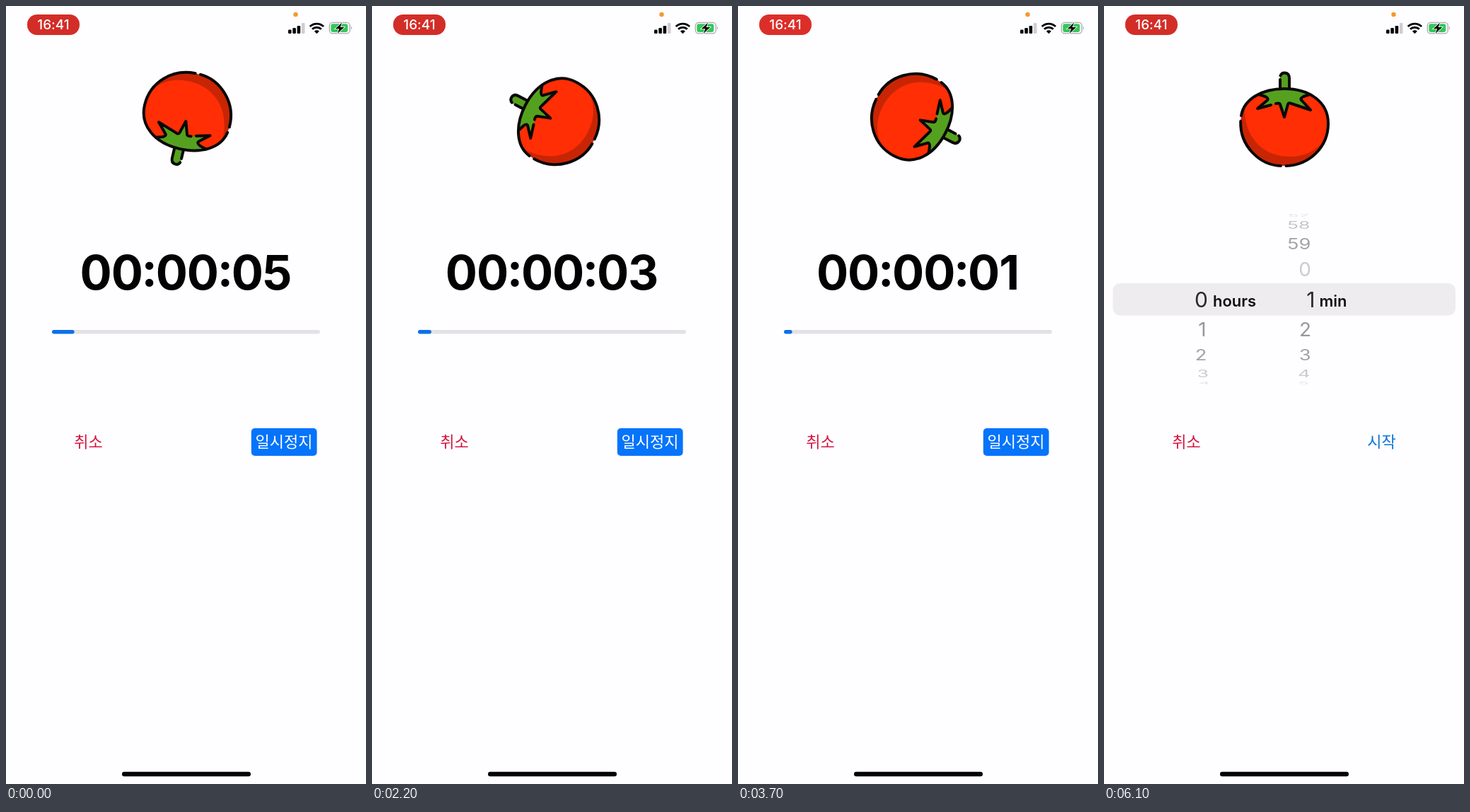
Write an HTML page that moves like this. It is 509 px wide and 1100 px high and loops after 6.2 s.

```html
<!DOCTYPE html>
<html lang="ko">
<head>
<meta charset="utf-8">
<title>Timer</title>
<style>
  html, body { margin: 0; width: 100%; height: 100%; overflow: hidden; background: #fefdff; }
  svg { display: block; width: 100%; height: 100%; }
  text { font-family: Inter, "Liberation Sans", sans-serif; font-feature-settings: "calt" 0; }
  .ko { font: 400 22px "Noto Sans CJK KR", "Noto Sans CJK", sans-serif; text-anchor: middle; }
  .unit { font-size: 22px; font-weight: 600; fill: #111013; }
  .row { font-size: 28px; text-anchor: end; }
  .sel { font-size: 30px; text-anchor: end; fill: #2a292c; }
  #clock { font-size: 67px; font-weight: 700; letter-spacing: -1.1px; text-anchor: middle; fill: #030203; }
  .ink { fill: none; stroke: #0b0807; stroke-width: 4; stroke-linecap: round; stroke-linejoin: round; }
</style>
</head>
<body>
<svg viewBox="0 0 509 1100" preserveAspectRatio="none">
  <defs>
    <clipPath id="bodyClip"><use href="#body"/></clipPath>
    <path id="body" d="M255 117C291 117 317 136 317 166C317 200 289 226 255 226C221 226 193 200 193 166C193 136 219 117 255 117Z"/>
  </defs>

  <!-- status bar -->
  <rect id="pill" x="30" y="12" width="74" height="29" rx="14"/>
  <text x="67" y="33.3" font-size="19" font-weight="500" fill="#fff" text-anchor="middle">16:41</text>
  <circle cx="409.5" cy="12" r="3.2" fill="#f39a2c"/>
  <g fill="#050505">
    <rect x="399" y="33.5" width="4.6" height="5.5" rx="1.2"/>
    <rect x="405.3" y="31" width="4.6" height="8" rx="1.2"/>
    <rect x="411.6" y="28" width="4.6" height="11" rx="1.2"/>
    <rect x="417.9" y="24" width="4.6" height="15" rx="1.2" fill="#cfcdd0"/>
    <path d="M439.4 39.3L435.9 35.8A5 5 0 0 1 442.9 35.8Z"/>
  </g>
  <g fill="none" stroke="#050505" stroke-width="2.9">
    <path d="M433 32.8A9.2 9.2 0 0 1 445.8 32.8"/>
    <path d="M429.7 29A14 14 0 0 1 449.1 29"/>
  </g>
  <rect x="457.3" y="23.3" width="29" height="15.6" rx="4.6" fill="none" stroke="#a9a8ab" stroke-width="1.3"/>
  <rect x="459.3" y="25.3" width="24" height="11.6" rx="2.8" fill="#35c65a"/>
  <path d="M488 28.6Q490 31 488 33.6Z" fill="#9b9a9d"/>
  <path d="M475 23.6L465.6 32.2H471.2L468.6 39L478.2 30H472.6Z" fill="#050505" stroke="#fefdff" stroke-width="1.6" paint-order="stroke"/>

  <!-- tomato -->
  <g id="tomato">
    <path d="M249 118V100Q249 95 255 95Q262 95 262 102V118Z" fill="#55a11f"/>
    <use href="#body" fill="#c82505"/>
    <g clip-path="url(#bodyClip)">
      <path d="M199 110V152C202 190 228 213 262 213C283 213 300 205 311 190L330 160V100H199Z" fill="#ff2e04"/>
      <path d="M219 125L232 131L217 145L238 139L247 137L255 157L261 137L292 147L278 131L291 125L280 112H230Z" fill="#55a11f"/>
    </g>
    <g class="ink">
      <path d="M249 115V104M249.5 98.5Q251 94.5 255.5 94.5Q262 95 262 102V116"/>
      <path d="M257.5 226C290 225 317 200 317 166C317 136 291 117 255 117C224 117 198 131 194 155"/>
      <path d="M193.2 163C192 198 220 225 250 226"/>
      <path d="M219 125L228 128Q234 131 230 134L217 145L236 140"/>
      <path d="M243 138Q248 136.5 249 139L255 157L260 139Q261 136 265 138L292 147L280 134Q276 131 282 128L291 125"/>
    </g>
  </g>

  <!-- countdown -->
  <g id="timer">
    <text id="clock" x="254" y="401"></text>
    <rect x="65" y="458" width="379" height="5.5" rx="2.75" fill="#e3e1e5"/>
    <rect id="bar" x="65" y="458" height="5.5" rx="2.75" fill="#0a71e8"/>
  </g>

  <!-- picker -->
  <g id="picker">
    <rect x="12.5" y="392" width="484.5" height="45.5" rx="10" fill="#eeecef"/>
    <text class="sel" x="147" y="425.5">0</text>
    <text class="unit" x="154" y="425">hours</text>
    <text class="sel" x="298.5" y="425.5">1</text>
    <text class="unit" x="304.5" y="425">min</text>
    <g id="rows"></g>
  </g>

  <!-- buttons -->
  <text class="ko" x="116.5" y="623.7" fill="#d3143f">취소</text>
  <g id="pause">
    <rect x="346.8" y="597" width="92.8" height="39" rx="5" fill="#0574fb"/>
    <text class="ko" x="393" y="623.7" fill="#fff">일시정지</text>
  </g>
  <text id="start" class="ko" x="392.5" y="623.7" fill="#0b74d6">시작</text>

  <rect x="164" y="1082.8" width="182" height="6.4" rx="3.2" fill="#050305"/>
</svg>
<script>
  const LOOP = 6200, STEP = 100, FIRST_TICK = 405, SECOND = 1000, HALF = 500;
  const $ = id => document.getElementById(id);
  const clamp = v => Math.min(1, Math.max(0, v));

  // cubic-bezier(.42, 0, .58, 1)
  function ease(x) {
    x = clamp(x);
    let lo = 0, hi = 1;
    for (let i = 0; i < 24; i++) {
      const s = (lo + hi) / 2, r = 1 - s;
      if (1.26 * r * r * s + 1.74 * r * s * s + s ** 3 < x) lo = s; else hi = s;
    }
    return lo * lo * (3 - 2 * lo);
  }

  // Wheel rows: label, right edge, centre y, vertical scale, grey level
  const rows = [
    ['57', 290, 296, .18, 226], ['58', 291.5, 309.5, .54, 196], ['59', 292.5, 336, .78, 164],
    ['0', 293, 372, .98, 204],
    ['2', 293, 457, .98, 152], ['3', 292.5, 493.5, .75, 162], ['4', 291.5, 519.5, .53, 202], ['5', 290, 533, .18, 228],
    ['1', 144.5, 457, .98, 152], ['2', 145.5, 493.5, .75, 162], ['3', 148, 519.5, .53, 202], ['4', 150, 533, .18, 228]
  ];
  $('rows').innerHTML = rows.map(([label, x, y, sy, g]) =>
    `<text class="row" transform="translate(${x} ${y}) scale(${.9 + .1 * sy} ${sy})" y="10.2" fill="rgb(${g},${g - 1},${g + 2})">${label}</text>`
  ).join('');

  const colon = '<tspan dx="-1.2" dy="-5">:</tspan>';
  const clockText = s => `00${colon}<tspan dx="-1.2" dy="5">00</tspan>${colon}<tspan dx="-1.2" dy="5">0${s}</tspan>`;
  const barWidth = s => s > 0 ? Math.max(11, 379 * s / 60) : 0;
  let shown = -1;

  function draw(t) {
    const tick = Math.floor((t - FIRST_TICK) / SECOND);
    const since = t - FIRST_TICK - tick * SECOND;
    const left = Math.max(0, 4 - tick);
    const done = tick > 4;

    // Two eased half turns per tick
    const first = done ? 1 : ease(since / HALF);
    const second = done ? 1 : ease((since - HALF) / HALF);
    $('tomato').setAttribute('transform', `rotate(${180 * (first + second)} 255 160)`);

    if (left !== shown) {
      $('clock').innerHTML = clockText(left);
      shown = left;
    }
    const from = barWidth(left + 1), to = barWidth(left);
    $('bar').setAttribute('width', from + (to - from) * first);

    const stop = FIRST_TICK + 4 * SECOND;
    const fade = ease((t - stop) / HALF);
    $('timer').setAttribute('opacity', 1 - fade);
    $('picker').setAttribute('opacity', fade);
    $('pause').style.display = t < stop ? '' : 'none';
    $('start').style.display = t < stop ? 'none' : '';

    // Recording pill pulses every two seconds
    const glow = clamp(.5 - .62 * Math.cos(Math.PI * (t - 50) / 1000));
    $('pill').setAttribute('fill', `rgb(${211 + 43 * glow},${45 + 6 * glow},${40 + 5 * glow})`);
  }

  const begin = performance.now();
  function frame() {
    const t = (performance.now() - begin + 5) % LOOP;
    draw(Math.floor(t / STEP) * STEP);
    requestAnimationFrame(frame);
  }
  frame();
</script>
</body>
</html>
```
